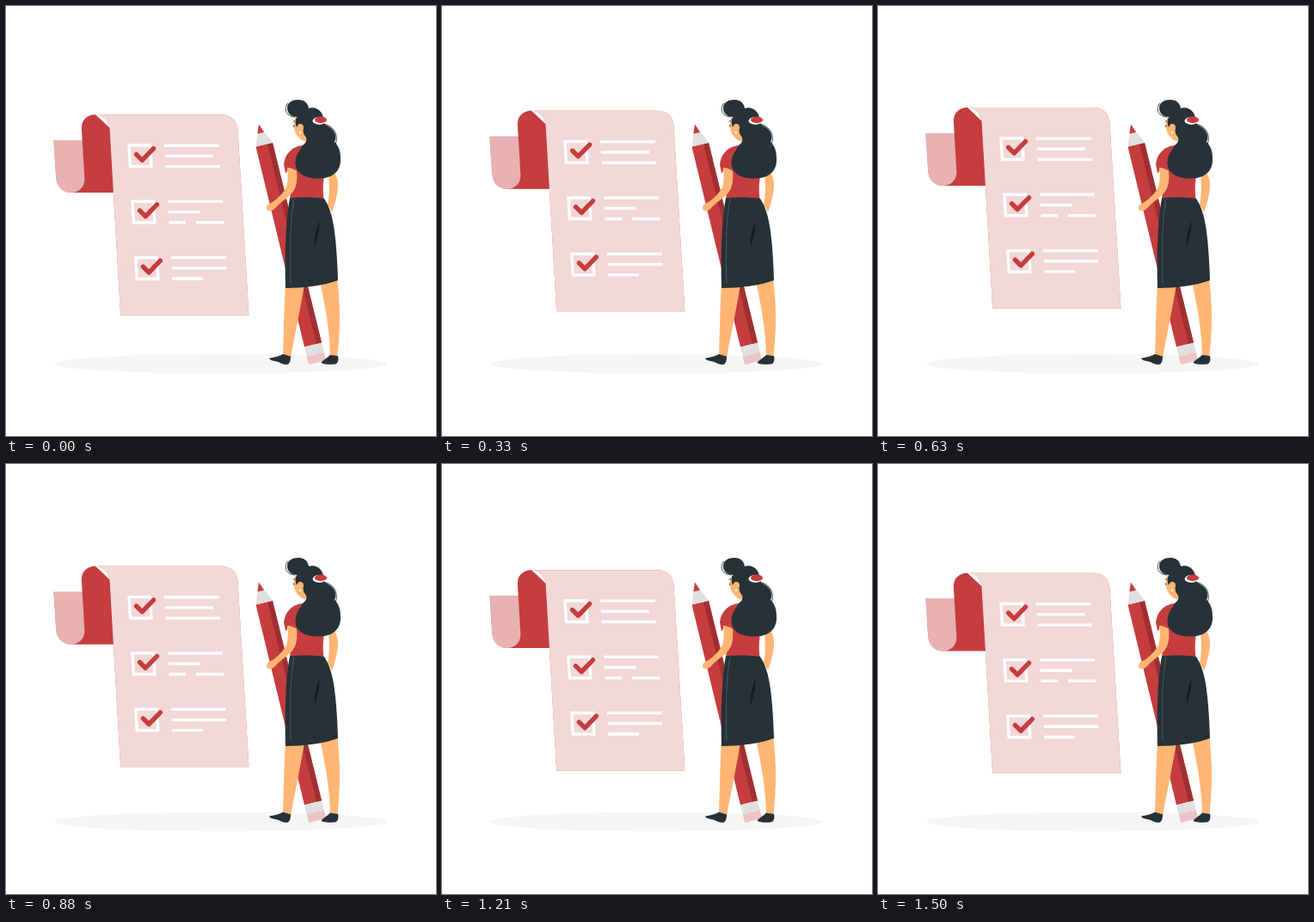
An HTML page that plays this animation: 500x500 px, repeating every 1540 ms.

```html
<!DOCTYPE html>
<html lang="en">
<head>
<meta charset="utf-8">
<title>Checklist</title>
<style>
  html, body { margin: 0; width: 100%; height: 100%; overflow: hidden; background: #fff; }
  svg { display: block; width: 100%; height: 100%; }
  .red { fill: #c53d3e; }
  .dark { fill: #263238; }
  .skin { fill: #ffb573; }
  .line { fill: none; stroke: #fff; stroke-width: 3.4; }
  .tick { fill: none; stroke: #c53d3e; stroke-width: 5.4; stroke-linecap: round; stroke-linejoin: round; }
  .strand { fill: none; stroke: #263238; stroke-width: .9; }
</style>
</head>
<body>
<svg viewBox="0 0 500 500">
  <defs>
    <path id="sheet" d="M104 126.2H251C261 126.2 268.7 133 269.4 143L282.4 359.5H133.2L120.6 143C120 133 113 126.2 104 126.2Z"/>
    <path id="flap" d="M55.4 156L58.2 200C59 210 66 217 75.5 217C85 217 92 210 91.3 200L88.6 156Z"/>
    <g id="box">
      <path class="line" d="M143 162H167.6L169 186.6H144.5Z"/>
      <path class="tick" d="M151.6 172.6L158.3 179.3L171.6 165.6"/>
    </g>
  </defs>

  <ellipse cx="249.5" cy="416" rx="193.5" ry="11.3" fill="#f5f5f5"/>

  <g id="paper">
    <use href="#flap" class="red"/>
    <use href="#flap" fill="#fff" opacity=".6"/>
    <path class="red" d="M104 126.2C94 126.2 87.2 133 87.9 143L91.3 200C92 210 85 217 75.5 217H126L122 143Z"/>
    <use href="#sheet" class="red"/>
    <use href="#sheet" fill="#fff" opacity=".8"/>
    <use href="#box"/>
    <use href="#box" x="3.9" y="65.3"/>
    <use href="#box" x="7.8" y="130.6"/>
    <path class="line" d="M184 162.2H248M184.7 174.4H241M185.5 186.6H249.3
      M188 227.4H252M188.8 239.6H226M189.5 251.8H209M221 251.8H253.2
      M192 292.6H255.8M192.6 304.8H256.4M193.3 317H229"/>
  </g>

  <!-- far arm and pencil -->
  <path class="skin" d="M374 188C381 190 386 198 386 208C386 220 382 231 379 240L374 231C376 222 377 210 374 188Z"/>
  <path class="red" d="M290.5 163.5L310 159L367 391.5L347 396.5Z"/>
  <path fill="#9f3032" d="M304 160.4L310 159L367 391.5L361 393Z"/>
  <path fill="#e0e0e0" d="M294 137.5L310 159L290.5 163.5ZM347 396.5L367 391.5L369.8 402.5L349.7 407.5Z"/>
  <path class="red" d="M294 137.5L300 146.7L292.4 148.4Z"/>
  <path fill="#edc3c5" d="M349.7 407.5L369.8 402.5L371.6 410Q372 412 370 412.6L354 416.8Q352 417.2 351.6 415.2Z"/>

  <!-- legs and shoes -->
  <path class="skin" d="M325 324H347C342 355 336 380 331 410L322 408C323 380 323 355 325 324ZM365 320L385 316C389 350 389 375 385 410L377 409C377 380 371 348 365 320Z"/>
  <path class="dark" d="M306 409.4C312 409 318 407 322 404.7L331 407.5C331 412 330 417 326 417C321 417 319 414 313 413C309 412.5 306.5 411 306 409.4ZM366.5 414.5C370 411 374 409 377 405.8L386 407C387 411 386.5 416 382 416.6C377 417 369 417.2 366.5 414.5Z"/>

  <!-- body -->
  <path class="red" d="M345 162C334 163 325 170 323 184L325 194C326.5 195 327 191 327.5 188L338 192C338 205 331 212 330 224H369.5C368 212 369 205 370 196L365 165Z"/>
  <path class="dark" d="M330 223.5C342 222 358 222 370 224C380 239 384 262 386 319C370 325 346 328 325 328C324 290 325 250 330 223.5Z"/>
  <path d="M335 224C330 250 330 285 331 322" fill="none" stroke="#59666b" stroke-width=".7"/>
  <path fill="#151d20" d="M364.5 250C360 261 358 270 359 280C362 270 365 262 364.5 250Z"/>
  <path class="skin" d="M327 188C330 188 335 189.5 338 192C339 202 338 211 333 217C327 224 319 228 313 235C310 238.5 306 239 304 237.5C302 235 303 231 307 229.5C313 227 321 219 326 211C328 204 328 196 327 188Z"/>

  <!-- head -->
  <path class="skin" d="M337 128C334 137 334 146 339 151C342 155 346 158 352 158L358 142L350 128Z"/>
  <path class="dark" d="M327 119C327 112 333 109 340 109C347 109 351 113 352 119C360 116 368 122 369 130C371 134 369 137 373 139C381 142 386 151 382 158C388 164 389 170 389 179C389 192 380 200 365 200.5C350 201 337 196 336.5 183C336.5 173 342 168 345 162C350 158 351 155 347 150C345 147 346 142 344 138C341 136 339 139 338 141C336 136 336 131 339 129C332 129 327 125 327 119Z"/>
  <path class="strand" d="M328 113C323 118 324 128 336 129M368 137C382 139 387 151 383 161"/>
  <path class="skin" d="M338.5 141C339 136.5 344 135.5 345.6 139C347 143 344 147 341 146Z"/>
  <circle cx="342" cy="147" r="1.2" fill="#fff"/>
  <path class="strand" d="M333.7 134.5L336 133.5M334.8 138.2V141"/>
  <ellipse cx="364.5" cy="133.5" rx="8" ry="4.4" fill="#fff"/>
  <ellipse class="red" cx="366" cy="132.4" rx="7" ry="3.8"/>
</svg>
<script>
  const paper = document.getElementById('paper');
  const LOOP = 1540, STEP = 1000 / 24, TOP = 721, TRAVEL = 10;

  // Steady rise and fall, sampled at 24 steps per second.
  function draw(now) {
    const time = Math.floor((now % LOOP + 5) / STEP) * STEP;
    const distance = Math.abs(time - TOP);
    const half = LOOP / 2;
    const fall = (half - Math.abs(half - distance)) / half * TRAVEL;
    paper.setAttribute('transform', `translate(0 ${(fall - 9.37).toFixed(3)})`);
    requestAnimationFrame(draw);
  }
  draw(0);
</script>
</body>
</html>
```
